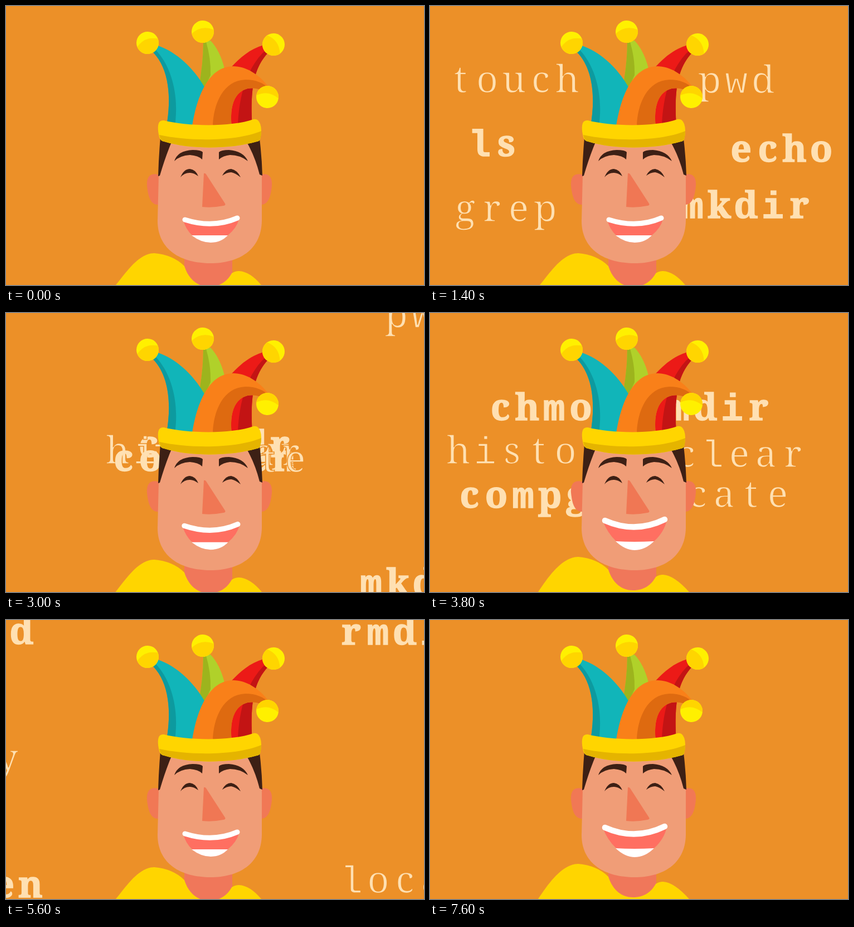
These frames come from a looping animation (750 px wide and 500 px high, 7.8 s). An HTML page:

```html
<!DOCTYPE html>
<html lang="en">
<head>
<meta charset="utf-8">
<title>Command line jester</title>
<style>
  html, body { margin: 0; width: 100%; height: 100%; overflow: hidden; background: #ec9028; }
  svg { display: block; width: 100vw; height: 100vh; }
  text {
    font: 400 68px "Noto Serif", serif; text-anchor: middle;
    fill: #ffe0b2; stroke: #ec9028; stroke-width: 1.5px;
  }
  .bold { font-weight: 700; font-size: 66px; stroke: #ffe0b2; }
  .mono { font-family: "Liberation Mono", monospace; }
</style>
</head>
<body>
<svg viewBox="0 0 750 500" preserveAspectRatio="none">
  <rect width="750" height="500" fill="#ec9028"/>
  <g id="words"></g>

  <!-- neck and shirt -->
  <path d="M320 440H406V500H320Z" fill="#f0775a"/>
  <path id="shirt" fill="#ffd500"/>

  <!-- head -->
  <g fill="#f17855">
    <path id="ear" d="M276 303C258 297 252 307 253 322C255 343 260 358 276 356Z"/>
    <use href="#ear" transform="matrix(-1 0 0 1 730 0)"/>
  </g>
  <path d="M278 235H455L459 303V385C458 438 417 461 367 461C314 461 272 437 272 385L274 303Z" fill="#f09d77"/>
  <g fill="#3d2015">
    <path d="M277 236L297 244Q286 270 276 304L273 305Q274 270 277 236Z"/>
    <path d="M432 244L455 238Q459 270 460 304L455 302Q447 270 432 244Z"/>
    <path d="M302 278Q308 259 335 258Q350 258 353 262L352 275Q345 268 330 267Q312 268 302 278Z"/>
    <path d="M382 262Q386 258 400 258Q426 260 434 278Q420 267 402 267Q390 268 382 275Z"/>
    <path d="M313 307Q319 292 330 292Q340 293 345 305Q336 298 329 299Q320 299 313 307Z"/>
    <path d="M388 304Q394 292 404 292Q415 294 421 307Q411 299 404 298Q396 298 388 304Z"/>
  </g>
  <path d="M355 300Q358 299 360 303L393 354Q395 357 390 358Q370 362 352 360Z" fill="#f07754"/>

  <path id="mouth" fill="#ff6f61"/>
  <path id="lower" fill="#fff"/>
  <path id="upper" fill="none" stroke="#fff" stroke-linecap="round"/>

  <!-- hat -->
  <path d="M354 64L367 62Q384 80 392 112L372 150H345Q354 105 354 64Z" fill="#b0d12a"/>
  <path d="M354 64H359Q368 95 367 124L355 150H345Q354 105 354 64Z" fill="#9db41d"/>
  <path d="M264 83L272 71C306 82 337 112 356 145L336 216H288C297 165 293 113 264 83Z" fill="#11b5b9"/>
  <path d="M264 83L268 78C297 108 311 160 303 216H288C297 165 293 113 264 83Z" fill="#0d9a9f"/>
  <path d="M462 70C438 77 420 92 402 112V216H442C437 140 448 108 470 84Z" fill="#ec1a17"/>
  <path d="M467 78C425 115 417 180 416 216H442C437 140 448 108 470 84Z" fill="#c31414"/>
  <path d="M334 216C342 165 362 108 408 108C430 108 454 122 471 145L456 150C432 141 398 152 405 216Z" fill="#f98019"/>
  <path d="M371 216C372 175 390 133 430 132C448 132 462 138 471 147L456 150C432 141 398 152 405 216Z" fill="#de6a10"/>
  <path d="M283 205C325 216 405 217 444 203Q452 201 456 211Q460 222 456 239Q455 242 450 243C400 257 330 257 284 243Q277 242 275 235Q271 218 274 210Q276 205 283 205Z" fill="#ffd500"/>
  <path d="M275 231C325 242 410 244 458 224Q458 232 456 239Q455 242 450 243C400 257 330 257 284 243Q277 242 275 231Z" fill="#e5b400"/>
  <g id="bells"></g>
</svg>
<script>
const LOOP = 7800, STEP = 200, PITCH = 48;
const NS = "http://www.w3.org/2000/svg";
const byId = id => document.getElementById(id);

function add(parent, tag, attrs) {
  const node = document.createElementNS(NS, tag);
  for (const key in attrs) node.setAttribute(key, attrs[key]);
  return parent.appendChild(node);
}

// Each bell: centre and tilt of its golden side
for (const [x, y, tilt] of [[254, 66, -22], [353, 46, -10], [480, 69, 55], [469, 163, 188]]) {
  const bell = add(byId("bells"), "g", { transform: `translate(${x} ${y}) rotate(${tilt})` });
  const flip = tilt > 90 ? 1 : 0;
  const [gold, bright] = flip ? ["#fff000", "#ffd500"] : ["#ffd500", "#fff000"];
  add(bell, "circle", { r: 20, fill: flip ? gold : bright });
  add(bell, "path", {
    d: `M-20 0Q0 ${flip ? 13 : -13} 20 0A20 20 0 0 1 -20 0Z`,
    fill: flip ? bright : gold
  });
}

// Word, bold, start step, start centre x and baseline, movement per step
const words = [
  ["touch", 0, 0, 383, 270, -33.2, -16.5],
  ["ls", 1, 0, 379, 277, -38, -1.1],
  ["grep", 0, 0, 380, 274, -35, 16],
  ["pwd", 0, 0, 376, 270, 24.8, -16.3],
  ["echo", 1, 0, 378, 271, 36, 1.1],
  ["mkdir", 1, 0, 406, 270, 23, 15.7],
  ["chmod", 1, 14, 384, 275, -32.3, -16.6],
  ["history", 0, 14, 382, 270, -37.4, 0],
  ["compgen", 1, 14, 390, 266, -35, 16.5],
  ["rmdir", 1, 14, 371, 274, 24.6, -16.4],
  ["clear", 0, 14, 380, 272, 35, 0.8],
  ["locate", 0, 14, 373, 269, 26.2, 15.7]
].map(([label, bold, start, x, y, dx, dy]) => {
  const xs = [...label].map((_, i) => (i - (label.length - 1) / 2) * PITCH);
  const node = add(byId("words"), "text", { x: xs.join(" "), class: bold ? "bold" : "" });
  for (const letter of label)
    add(node, "tspan", /[ilmw]/.test(letter) ? { class: "mono" } : {}).textContent = letter;
  return { node, start, x, y, dx, dy };
});

// 0 is the small smile, 1 the wide one
const laugh = [0, 0.15, 0.75, 1, 1, 1, 0.6];

function drawLaugh(p) {
  const m = (a, b) => a + (b - a) * p;
  const lift = m(0, -6);
  byId("shirt").setAttribute("d",
    `M${m(197, 194)} 500C${m(216, 213)} ${477 + lift} 238 ${443 + lift} 266 ${443 + lift}` +
    `Q300 ${446 + lift} 320 ${466 + lift}C328 ${491 + lift} 345 ${503 + lift} 364 ${503 + lift}` +
    `C385 ${503 + lift} 397 ${493 + lift} 405 ${479 + lift}Q411 ${475 + lift} 418 ${475 + lift}` +
    `Q438 ${476 + lift} ${m(458, 465)} 500V520H194Z`);
  byId("mouth").setAttribute("d",
    `M${m(318, 310)} ${m(384, 372)}Q${m(323, 318)} ${m(401, 394)} 334 ${m(411, 409)}` +
    `Q350 ${m(424, 425)} 367 ${m(424, 425)}Q386 ${m(424, 425)} ${m(398, 402)} ${m(411, 409)}` +
    `Q${m(414, 420)} ${m(398, 393)} ${m(418, 425)} ${m(382, 371)}` +
    `Q367 ${m(401, 396)} ${m(318, 310)} ${m(384, 372)}Z`);
  byId("lower").setAttribute("d",
    `M333 ${m(411, 409)}Q366 411 ${m(398, 402)} ${m(411, 409)}` +
    `Q386 ${m(424, 425)} 367 ${m(424, 425)}Q350 ${m(424, 425)} 333 ${m(411, 409)}Z`);
  byId("upper").setAttribute("d",
    `M${m(321, 314)} ${m(383, 372)}Q${m(371, 368)} ${m(399, 396)} ${m(415, 421)} ${m(380, 370)}`);
  byId("upper").setAttribute("stroke-width", m(9, 10.5));
}

function draw(time) {
  const step = Math.floor((time % LOOP) / STEP);
  for (const w of words) {
    const n = step - w.start;
    w.node.setAttribute("visibility", n > 0 ? "visible" : "hidden");
    w.node.setAttribute("transform", `translate(${w.x + w.dx * n} ${w.y + w.dy * n})`);
  }
  drawLaugh(laugh[step % laugh.length]);
}

const begin = performance.now();
function tick() {
  draw(performance.now() - begin);
  requestAnimationFrame(tick);
}
tick();
</script>
</body>
</html>
```
